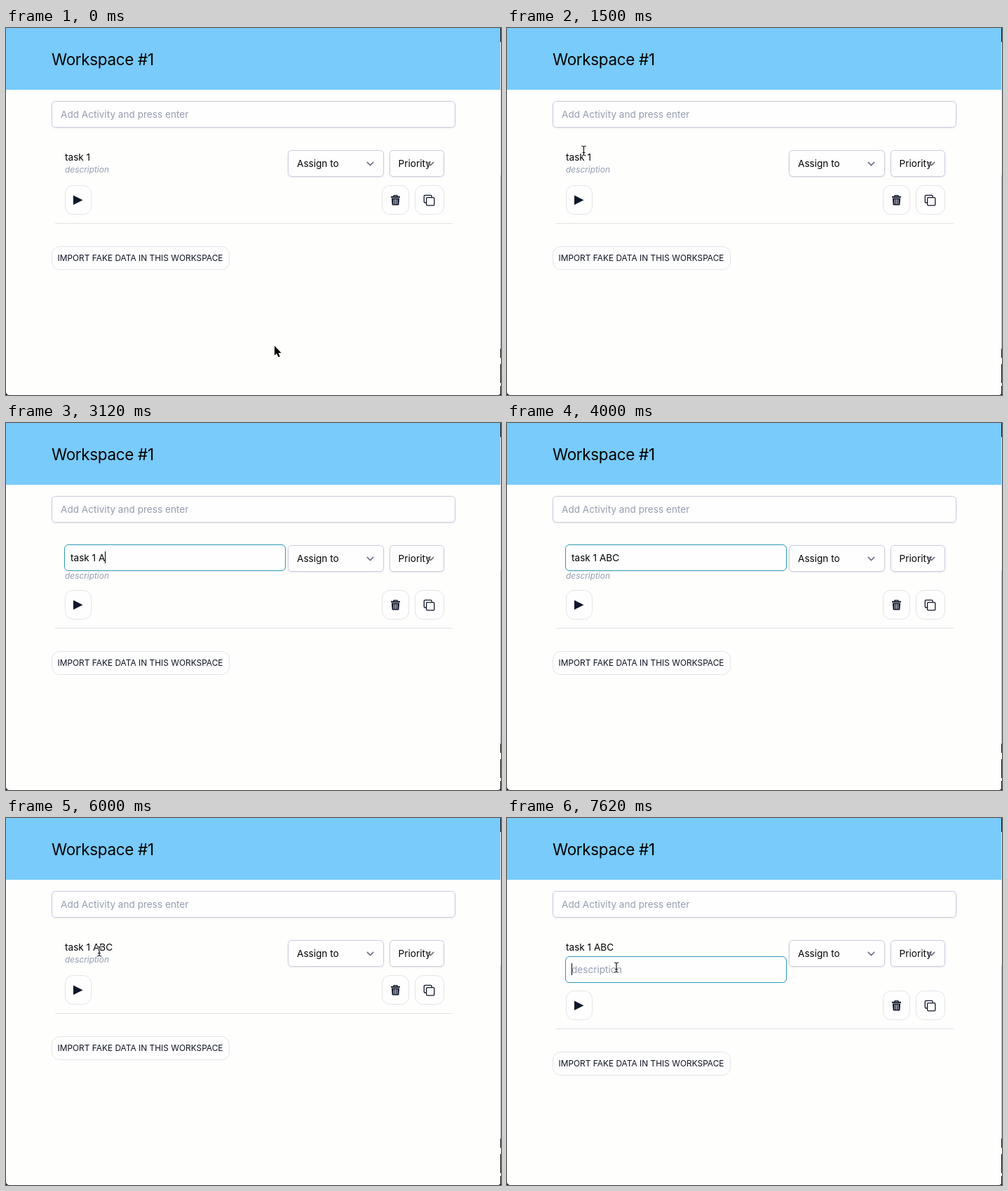
An HTML page for the animation above (8000 ms loop, 706 by 523 pixels).

```html
<!DOCTYPE html>
<html lang="en">
<head>
<meta charset="utf-8">
<title>Workspace</title>
<style>
html, body { margin: 0; height: 100%; overflow: hidden; background: #fefefd; }
svg { display: block; width: 706px; height: 523px; }
text { font: 13.6px Inter, sans-serif; fill: #000; white-space: pre; }
.head { font-size: 22.5px; letter-spacing: -.35px; }
.hint { fill: #949cb0; }
.small { font-size: 11.9px; font-style: italic; }
.caps { font-size: 11.9px; fill: #0f1424; }
.field { fill: #fefefe; stroke: #c9cbdf; filter: drop-shadow(0 1px 1px rgba(0, 0, 0, .09)); }
.edit { fill: #fefefe; stroke: #2b9bb5; }
.btn { fill: #fefefe; stroke: #e3e4e9; }
.chev { fill: none; stroke: #6b7280; stroke-width: 1.6; stroke-linecap: round; stroke-linejoin: round; }
.ink { fill: #10162a; }
.line { fill: none; stroke: #10162a; stroke-width: 1.3; stroke-linejoin: round; }
</style>
</head>
<body>
<svg viewBox="0 0 706 523">
  <rect width="706" height="523" fill="#fefefd"/>
  <rect width="705" height="88" fill="#78cbfb"/>
  <path d="M705.5 20V210" stroke="#e4e4ea"/>
  <path d="M705.5 210V457" stroke="#b8b8bc"/>
  <path d="M705.5 0V20M705.5 457V470M705.5 479V506M705.5 510V523" stroke="#111"/>
  <path d="M0 519Q.5 522.5 4 523H0ZM706 519Q705.5 522.5 702 523H706Z" fill="#111"/>
  <text class="head" x="65" y="53">Workspace #1</text>

  <rect class="field" x="65.5" y="104.5" width="575" height="37" rx="5"/>
  <text class="hint" x="78" y="128">Add Activity and press enter</text>
  <rect class="field" x="402.5" y="174.5" width="136" height="37" rx="5"/>
  <text x="415" y="198">Assign to</text>
  <path class="chev" d="M515.3 191.4l4.2 4.2 4.2-4.2"/>
  <rect class="field" x="547.5" y="174.5" width="77" height="37" rx="5"/>
  <text x="559.5" y="198">Priority</text>
  <path class="chev" d="M601.3 191.4l4.2 4.2 4.2-4.2"/>

  <rect id="box" class="edit" x="83.5" width="315" height="37" rx="5.5"/>
  <text id="name"></text>
  <text id="desc">description</text>
  <path id="caret" d="M0 0V17" stroke="#000"/>

  <g id="lower">
    <rect class="btn" x="84.5" y="224.5" width="37" height="41" rx="11"/>
    <path class="ink" d="M96 238.5L109.5 245.2L96 252Z"/>
    <rect class="btn" x="536.5" y="224.5" width="38" height="41" rx="11"/>
    <path class="line" d="M553 240V238.7H558V240"/>
    <path class="ink" d="M549 239.8H562V241.7H549ZM549.9 242.4H561.1L560.4 251.5Q560.3 252.6 559.2 252.6H551.8Q550.7 252.6 550.6 251.5Z"/>
    <path d="M553.2 244V251M555.5 244V251M557.8 244V251" stroke="#fefefe" stroke-width=".9"/>
    <rect class="btn" x="583.5" y="224.5" width="41" height="41" rx="11"/>
    <path class="line" d="M599.5 249H597.6Q596.3 249 596.3 247.7V239.6Q596.3 238.3 597.6 238.3H605.8Q607.1 238.3 607.1 239.6V241.5"/>
    <rect class="line" x="599.6" y="241.6" width="11.2" height="11.2" rx="1.3"/>
    <path d="M70 278.5H637" stroke="#e2e3e7"/>
    <rect class="btn" x="65.5" y="311.5" width="253" height="33" rx="11"/>
    <text class="caps" x="73.5" y="332">IMPORT FAKE DATA IN THIS WORKSPACE</text>
  </g>

  <path id="arrow" d="M0 0V13.6L3.1 10.8L5.4 16L7.7 15L5.4 10H9.6Z"
    stroke="#fff" stroke-width="1.6" paint-order="stroke" stroke-linejoin="round"/>
  <g id="beam" fill="none">
    <path id="stem" d="M-3.2-7Q-.6-7 0-5.6Q.6-7 3.2-7M-3.2 7Q-.6 7 0 5.6Q.6 7 3.2 7M0-5.6V5.6M-1.8 2.5H1.8" stroke="#fff" stroke-width="2.6"/>
    <use href="#stem" id="core"/>
    <path d="M-3.2-7Q-.6-7 0-5.6Q.6-7 3.2-7M-3.2 7Q-.6 7 0 5.6Q.6 7 3.2 7M0-5.6V5.6M-1.8 2.5H1.8" stroke="#000" stroke-width="1.1"/>
  </g>
</svg>
<script>
const $ = id => document.getElementById(id);
const [box, name_, desc, caret, lower, arrow, beam] =
  ['box', 'name', 'desc', 'caret', 'lower', 'arrow', 'beam'].map($);

// Each list holds its value from the given time on.
const pointer = [
  [0, arrow, 383, 453], [210, arrow, 378, 446], [410, arrow, 362, 428],
  [500, arrow, 338, 400], [700, arrow, 296, 352], [910, arrow, 236, 288],
  [1120, arrow, 176, 228], [1320, arrow, 130, 192], [1500, beam, 109.5, 175],
  [1700, beam, 109.5, 180], [1910, beam, 109.5, 182], [2910, null],
  [4620, beam, 112, 184], [4830, beam, 117, 200], [5000, arrow, 121, 222],
  [5200, arrow, 122.5, 229], [5620, arrow, 124, 226], [5830, arrow, 128, 214],
  [6000, beam, 133, 190], [6410, beam, 128, 200], [6620, beam, 124.5, 204.5],
  [7000, beam, 132, 207], [7200, beam, 146, 211], [7410, beam, 154, 213],
  [7620, beam, 156, 213]
];
const modes = [[0, 'view'], [1910, 'name'], [5410, 'view'], [6410, 'hover'], [6830, 'desc']];
const typing = [[0, 'task 1'], [2910, 'task 1\u00a0'], [3120, 'task 1 A'], [3500, 'task 1 AB'], [3700, 'task 1 ABC']];
const blink = [[0, true], [2540, false], [2910, true], [4000, false], [4620, true], [5200, false], [6830, true], [7200, false], [7620, true]];
const shift = { view: 0, name: 14, hover: 6, desc: 22 };
const descY = { view: 206, name: 222, hover: 213, desc: 221 };

const at = (list, t) => list.findLast(e => e[0] <= t);
const show = (el, on) => el.style.display = on ? '' : 'none';
const move = (el, x, y) => el.setAttribute('transform', `translate(${x} ${y})`);

function draw() {
  const t = performance.now() % 8000;
  const mode = at(modes, t)[1];
  const inName = mode === 'name', inDesc = mode === 'desc', editing = inName || inDesc;

  name_.textContent = at(typing, t)[1];
  move(name_, inName ? 92 : 84, inName ? 197 : 189);
  desc.setAttribute('class', mode === 'view' || inName ? 'hint small' : 'hint');
  move(desc, inDesc ? 92 : 84, descY[mode]);
  move(lower, 0, shift[mode]);

  show(box, editing);
  box.setAttribute('y', inDesc ? 197.5 : 173.5);
  show(caret, editing && at(blink, t)[1]);
  const end = inName ? Math.round(name_.getComputedTextLength()) : 0;
  move(caret, 92.5 + end, inDesc ? 207 : 183);

  const [, shape, x, y] = at(pointer, t);
  show(arrow, shape === arrow);
  show(beam, shape === beam);
  if (shape) move(shape, x, y);
  requestAnimationFrame(draw);
}
draw();
</script>
</body>
</html>
```
